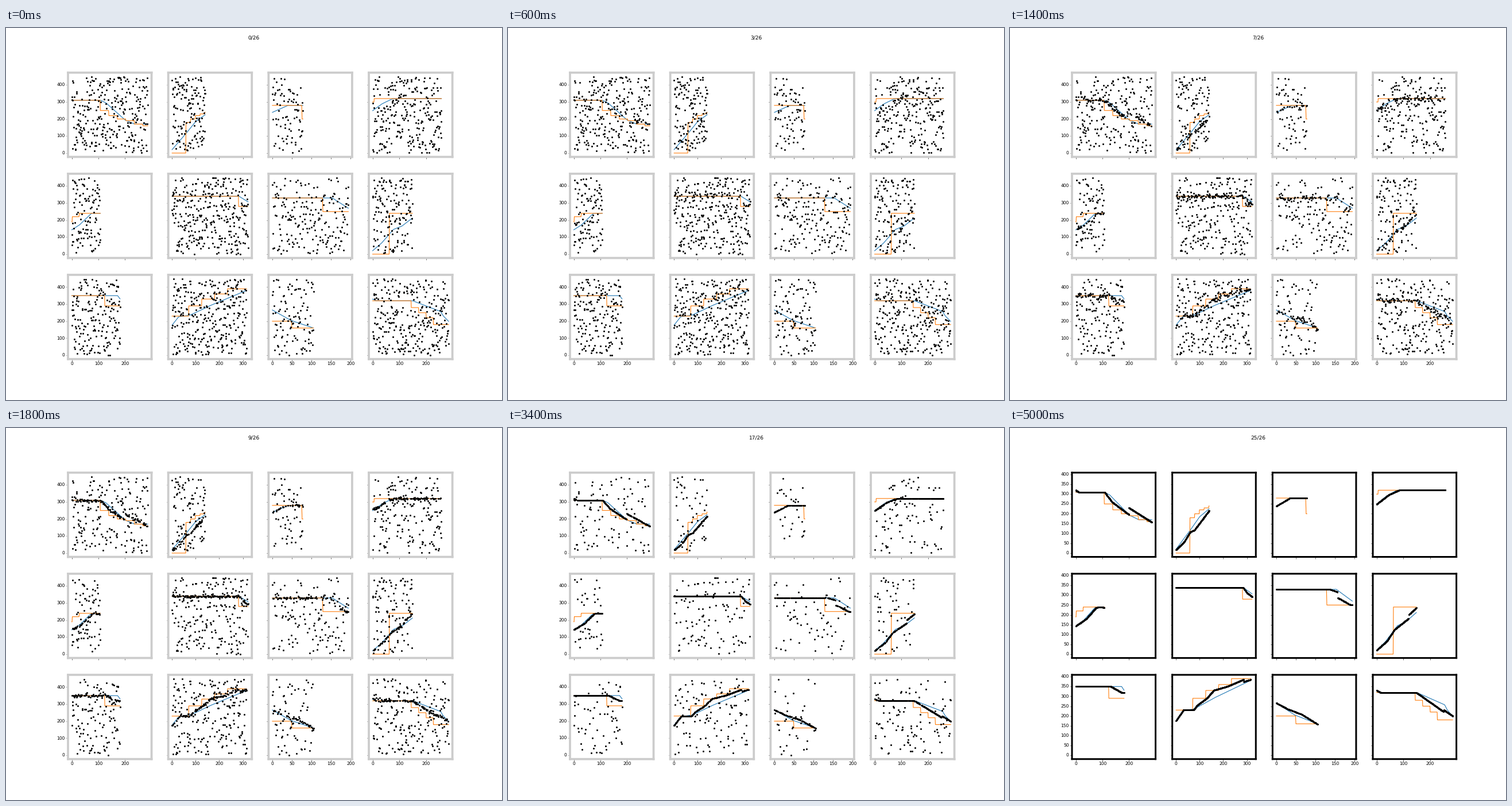
A matplotlib script that plays this animation: 864x648 px, repeating every 5200 ms.

```python
import numpy as np
import matplotlib.pyplot as plt
from matplotlib.animation import FuncAnimation

STEPS = 26
TOP = 450

plt.rcParams["text.hinting"] = "none"
fig, axes = plt.subplots(3, 4, figsize=(16, 12), dpi=54, sharex="col", sharey=True)
title = fig.suptitle("")
panels = []


def curve(x, keys):
    """Straight runs between key points, level outside them."""
    return np.interp(x, *np.array(keys, float).T)


def stairs(x, y0, y1, x0, x1=None, count=1, bend=1):
    """Evenly spaced jumps from y0 to y1, with levels rounded to tens."""
    edges = np.linspace(x0, x1 or x0, count)
    done = np.searchsorted(edges, x, side="right") / count
    return np.round(y0 + (y1 - y0) * done ** bend, -1)


class Panel:
    """Two reference lines and a cloud of dots that settles on a path."""

    def __init__(self, seed, ax, n, smooth, steps, path):
        self.seed, self.ax = seed, ax
        x = np.arange(n + 1)
        rng = np.random.default_rng(seed + 40)
        self.path = curve(x, path)
        self.noise = rng.uniform(0, TOP, n + 1)
        self.order = (rng.permutation(n + 1) + 0.5) / (n + 1)
        ax.plot(x, curve(x, smooth), color="tab:blue")
        ax.plot(x, stairs(x, *steps), color="tab:orange")
        self.dots, = ax.plot(x, self.path, ".", color="black")
        for spine in ax.spines.values():
            spine.set_snap(False)

    def values(self, k):
        if k == STEPS - 1:
            return self.path
        rng = np.random.default_rng([self.seed, k])
        spread = 105 * np.exp(-0.4 * k)
        guess = self.path + rng.laplace(0, spread, len(self.path))
        guess = np.where((guess < 0) | (guess > TOP), self.noise, guess)
        return np.where(self.order < k / STEPS, guess, self.noise)

    def frame(self, color, width):
        for spine in self.ax.spines.values():
            spine.set(color=color, linewidth=width)


def add(n, smooth, steps, path):
    i = len(panels)
    panels.append(Panel(i, axes.flat[i], n, smooth, steps, path))


# top row
add(285, smooth=[(108, 310), (128, 295), (201, 193), (236, 170)],
    steps=(310, 160, 107, 267, 6, 0.5),
    path=[(0, 320), (12, 310), (108, 310), (136, 260), (199, 196), (200, 230), (285, 157)])
add(140, smooth=[(0, 20), (58, 113), (100, 185), (140, 225)],
    steps=(0, 240, 59, 139, 5, 0.18),
    path=[(0, 17), (33, 55), (60, 108), (77, 116), (140, 216)])
add(78, smooth=[(0, 239), (40, 280)], steps=(280, 200, 76),
    path=[(0, 239), (35, 280)])
add(258, smooth=[(0, 249), (35, 289), (76, 320)], steps=(300, 320, 6),
    path=[(0, 249), (46, 297), (84, 320)])

# middle row
add(107, smooth=[(0, 143), (29, 172), (74, 240)], steps=(190, 240, 2, 28, 2, 0.74),
    path=[(0, 143), (40, 181), (76, 236), (90, 241), (107, 237)])
add(322, smooth=[(284, 340), (322, 307)], steps=(340, 280, 282),
    path=[(284, 340), (300, 313), (322, 292)])
add(194, smooth=[(153, 330), (194, 270)], steps=(330, 250, 129),
    path=[(0, 329), (135, 331), (156, 317), (157, 287), (190, 250)])
add(149, smooth=[(0, 20), (33, 64), (78, 145), (110, 165), (149, 212)],
    steps=(0, 240, 63),
    path=[(0, 20), (39, 67), (67, 125), (120, 182), (121, 201), (149, 236)])

# bottom row
add(181, smooth=[(172, 350), (181, 331)], steps=(350, 290, 124),
    path=[(132, 350), (172, 319)])
add(316, smooth=[(0, 177), (28, 226), (77, 236), (162, 292), (316, 381)],
    steps=(230, 390, 71, 235, 4, 0.7),
    path=[(0, 176), (31, 230), (74, 230), (90, 255), (130, 290), (160, 331),
          (218, 351), (286, 386), (287, 375), (316, 385)])
add(105, smooth=[(0, 266), (47, 205), (105, 160)], steps=(200, 160, 50),
    path=[(0, 266), (28, 236), (65, 208), (105, 158)])
add(285, smooth=[(0, 330), (13, 320), (150, 320), (255, 257), (265, 231), (285, 199)],
    steps=(320, 180, 145, 228, 4),
    path=[(0, 330), (14, 320), (148, 320), (251, 222), (253, 230), (285, 200)])


def update(k):
    title.set_text(f"{k}/{STEPS}")
    last = k == STEPS - 1
    top = 390
    for p in panels:
        y = p.values(k)
        top = max(top, y.max())
        p.dots.set_ydata(y)
        p.frame("black" if last else "0.8", 4 if last else 5)
    axes[0, 0].set_ylim(-0.05 * top, 1.05 * top)


anim = FuncAnimation(fig, update, frames=STEPS, interval=200, repeat=True,
                     repeat_delay=0, blit=False)
plt.show()
```
